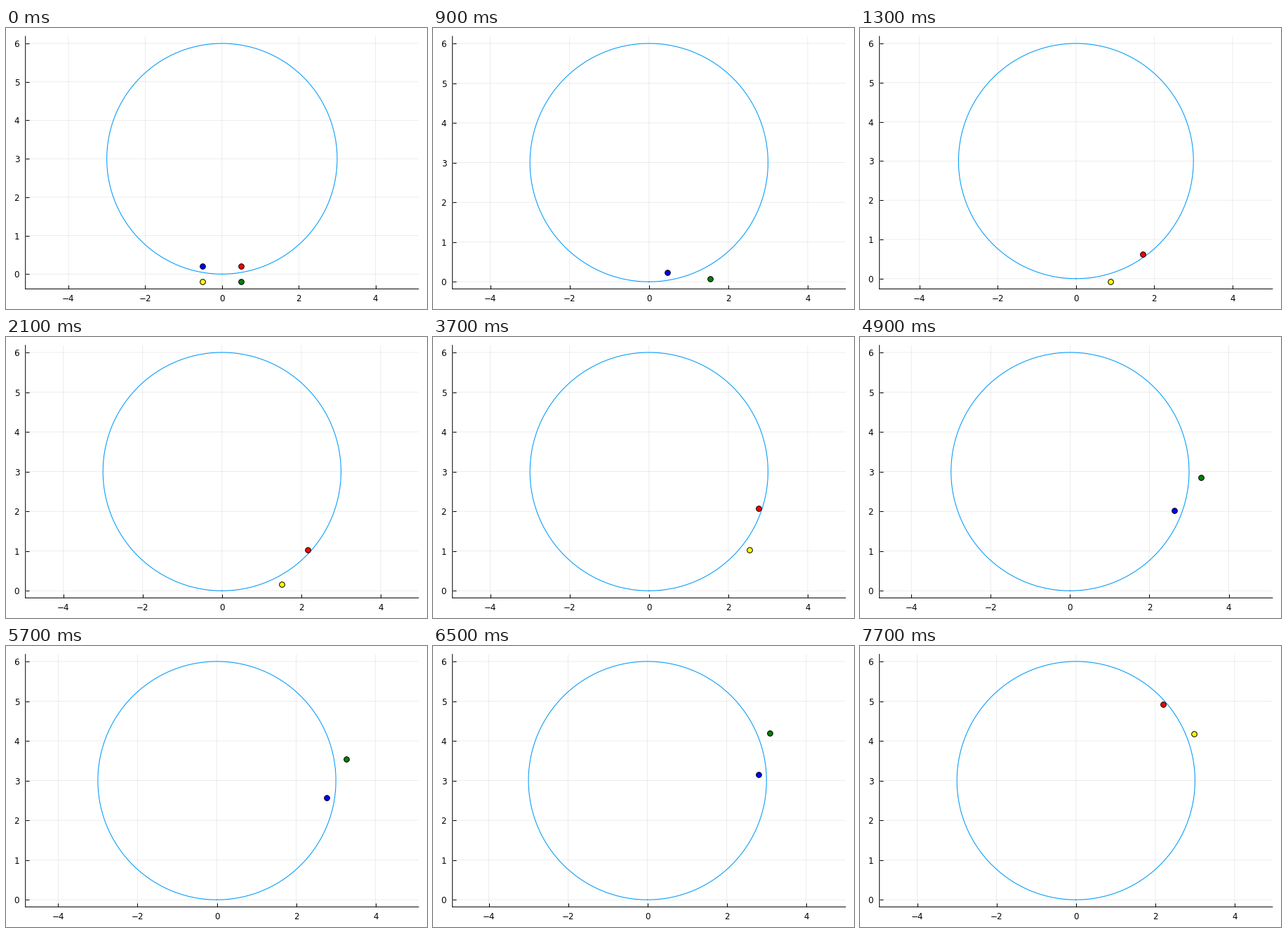
These frames come from a looping animation (600 by 400 pixels, 8000 ms). A matplotlib script:

```python
import numpy as np
import matplotlib.pyplot as plt
from matplotlib.animation import FuncAnimation

W, H, DPI = 600, 400, 100
PX = 72 / DPI                                   # one pixel in points
LEFT, RIGHT, TOP, BOTTOM = 27.7, 587.9, 11.8, 371.4

R = 3.0                                         # track radius, centre (0, R)
TURN = np.radians(5.97)                         # body travel per step
LEAD = R * TURN                                 # feet land this far ahead
FEET = {"blue": (-0.5, 0.2), "green": (0.5, -0.2),
        "red": (0.5, 0.2), "yellow": (-0.5, -0.2)}

plt.rcParams["font.family"] = "DejaVu Sans"
plt.rcParams["path.snap"] = False
fig = plt.figure(figsize=(W / DPI, H / DPI), dpi=DPI, facecolor="white")
ax = fig.add_axes([LEFT / W, 1 - BOTTOM / H,
                   (RIGHT - LEFT) / W, (BOTTOM - TOP) / H])
ax.spines[["top", "right"]].set_visible(False)
ax.spines[["left", "bottom"]].set_linewidth(PX)
ax.set_xticks(range(-4, 5, 2))
ax.set_yticks(range(7))
ax.tick_params(direction="in", length=5 * PX, width=PX, labelsize=8.6)
ax.tick_params(axis="x", pad=5.2)
ax.tick_params(axis="y", pad=6.1)
ax.grid(color="black", alpha=0.1, linewidth=0.5)
ax.set_axisbelow(True)

t = np.linspace(0, 2 * np.pi, 241)
ax.plot(R * np.sin(t), R - R * np.cos(t), color="#009AF9", lw=1.05 * PX)
dots = {c: ax.plot([], [], "o", color=c, ms=5.5, mec="black", mew=PX,
                   clip_on=False, snap=False, zorder=5)[0] for c in FEET}


def place(step, foot):
    """Ground position of a foot at the given step."""
    if step < 2:
        return foot
    a = TURN * (step - 0.737)
    c, s = np.cos(a), np.sin(a)
    x, y = foot[0] + LEAD, foot[1]
    return R * s + x * c - y * s, R - R * c + x * s + y * c


def stance(step):
    """Diagonal pairs take turns on the ground."""
    if step == 0:
        return tuple(FEET)
    return ("blue", "green") if step % 2 else ("red", "yellow")


def fit_view(points):
    xs, ys = zip(*points)
    x0, x1 = min(-R, *xs), max(R, *xs)
    y0, y1 = min(0, *ys), max(2 * R, *ys)
    pad = 0.03 * (y1 - y0)
    half = (y1 - y0 + 2 * pad) * (RIGHT - LEFT) / (BOTTOM - TOP) / 2
    mid = (x0 + x1) / 2
    ax.set_xlim(mid - half, mid + half)
    ax.set_ylim(y0 - pad, y1 + pad)


def update(i):
    step = (i + 3) // 4
    down = {c: place(step, FEET[c]) for c in stance(step)}
    for c, dot in dots.items():
        dot.set_visible(c in down)
        if c in down:
            dot.set_data([down[c][0]], [down[c][1]])
    fit_view(down.values())
    return list(dots.values())


anim = FuncAnimation(fig, update, frames=80, interval=100,
                     repeat=True, repeat_delay=0, blit=False)
plt.show()
```
